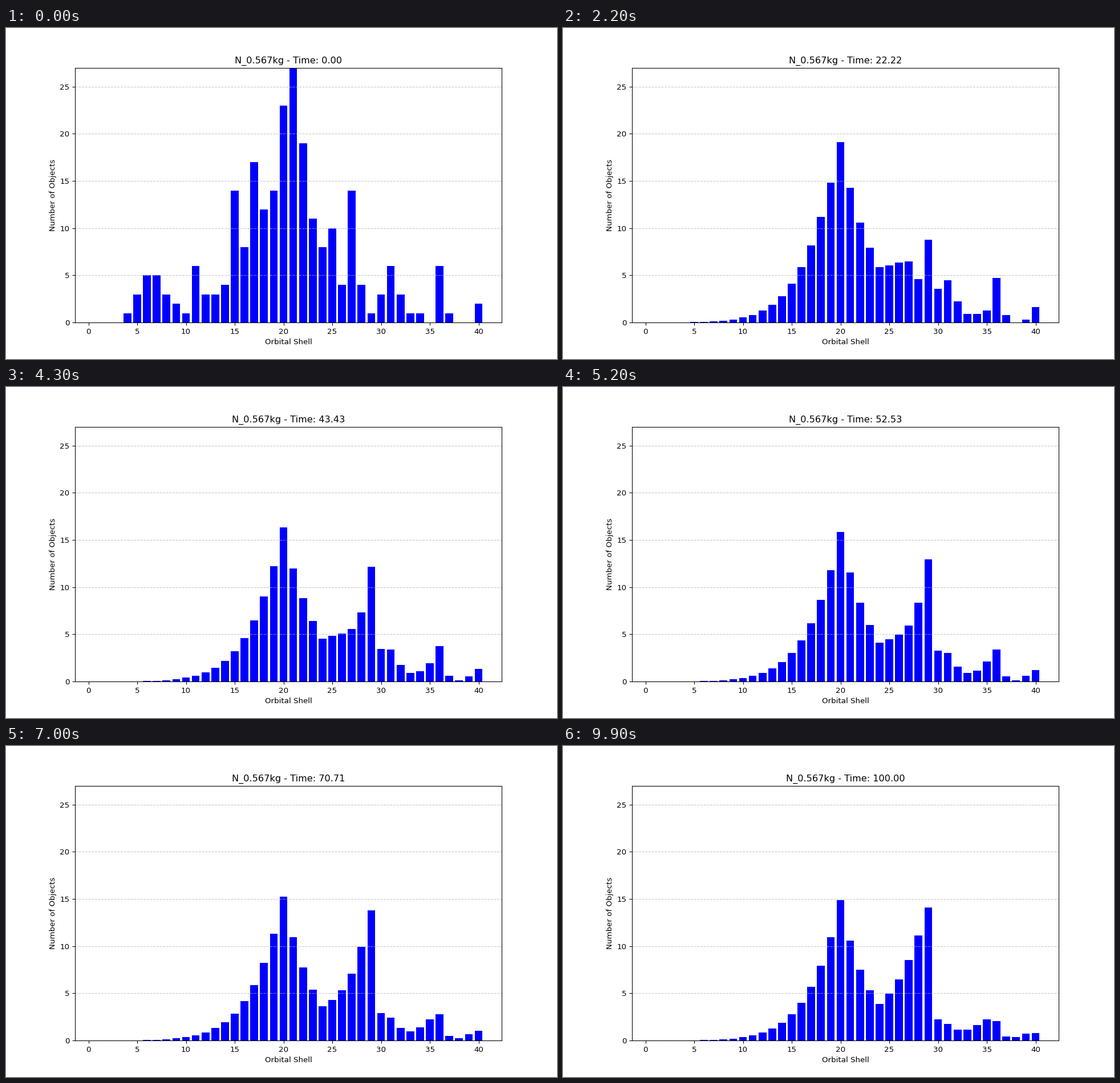
A matplotlib script that plays this animation: 966x580 px, repeating every 10000 ms.

```python
import numpy as np
import matplotlib.pyplot as plt
from matplotlib.animation import FuncAnimation

FRAMES = 100
SUBSTEPS = 20
DPI = 96.6

shells = np.arange(1, 41)
times = np.linspace(0, 100, FRAMES)

# Objects per shell at time zero
start = [0, 0, 0, 1, 3, 5, 5, 3, 2, 1, 6, 3, 3, 4, 14, 8, 17, 12, 14, 23,
         27, 19, 11, 8, 10, 4, 14, 4, 1, 3, 6, 3, 1, 1, 0, 6, 1, 0, 0, 2]


def lifetime(s):
    """Years an object stays in shell s before drag lowers it by one."""
    if s >= 30:
        return 37 + 6.8 * (s - 30)
    if s >= 20:
        return 27 * 1.21 ** (s - 29)
    d = 20 - s
    return lifetime(20) * np.exp(-0.3 * d - 0.0075 * d ** 2)


def launches(s):
    """New objects per year in shell s."""
    if s == 29:
        return 0.46
    return 1.26 * 0.59 ** (s - 20) if 20 <= s < 24 else 0


def simulate():
    """Objects sink shell by shell; implicit steps keep short lifetimes stable."""
    dt = times[1] / SUBSTEPS
    rate = np.array([1 / lifetime(s) for s in shells])
    added = dt * np.array([launches(s) for s in shells])
    sinking = np.diag(-rate) + np.diag(rate[1:], k=1)
    step = np.linalg.inv(np.eye(len(shells)) - dt * sinking)

    n = np.array(start, float)
    counts = [n]
    for _ in times[1:]:
        for _ in range(SUBSTEPS):
            n = step @ (n + added)
        counts.append(n)
    return counts


counts = simulate()

# The tiny surplus keeps the pixel size from rounding down
fig, ax = plt.subplots(figsize=((966 + 1e-6) / DPI, (580 + 1e-6) / DPI), dpi=DPI)
bars = ax.bar(shells, counts[0], color="blue")
ax.set_ylim(0, 27)
ax.set_xlabel("Orbital Shell")
ax.set_ylabel("Number of Objects")
ax.grid(axis="y", linestyle="--", alpha=0.7)
title = ax.set_title("")


def update(frame):
    for bar, n in zip(bars, counts[frame]):
        bar.set_height(n)
    title.set_text(f"N_0.567kg - Time: {times[frame]:.2f}")
    return [*bars, title]


anim = FuncAnimation(fig, update, frames=FRAMES, interval=100,
                     repeat=True, repeat_delay=0, blit=False)
plt.show()
```
